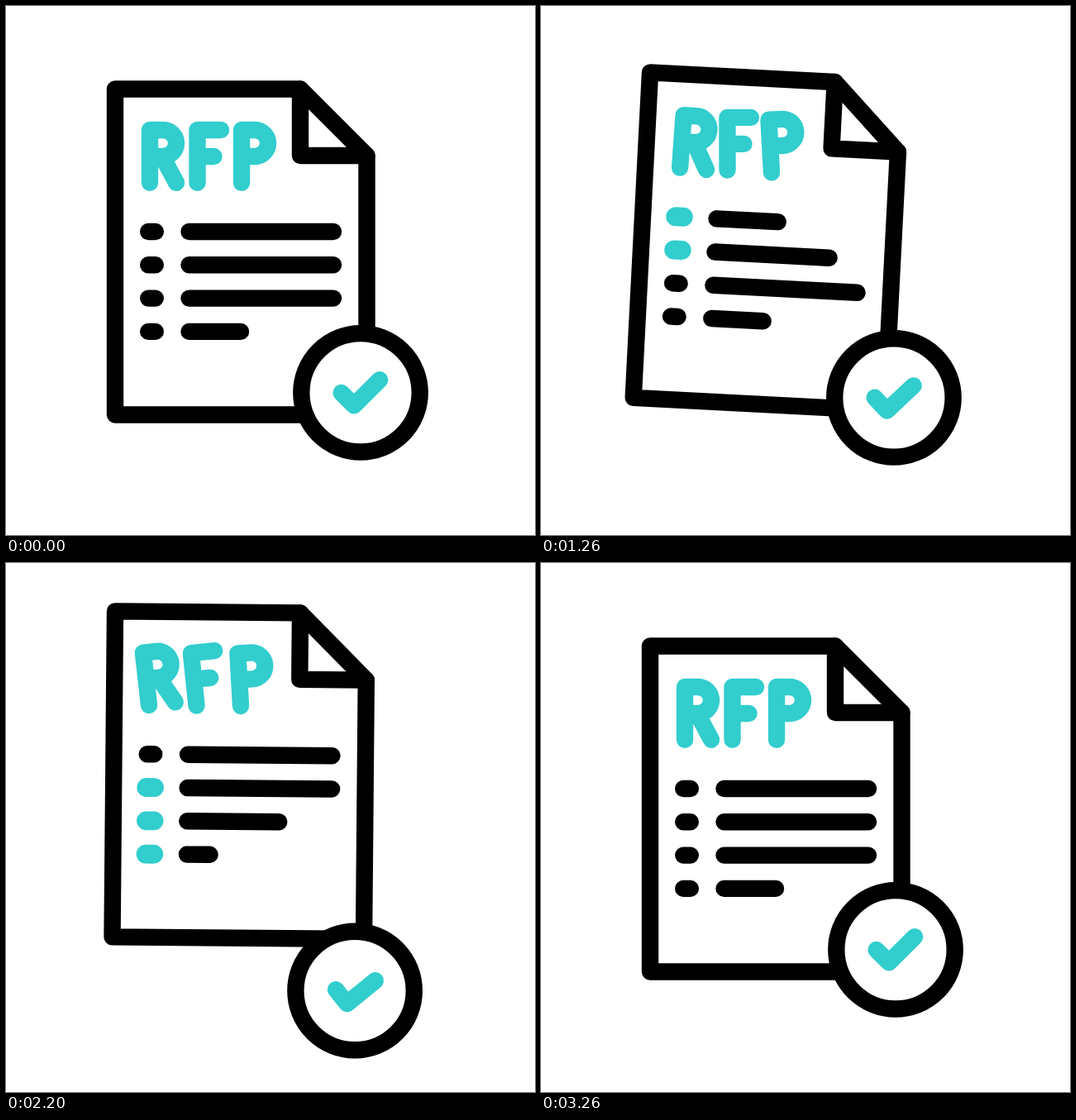
These frames come from a looping animation (640x640 px, 3.6 s). An HTML page with a canvas:

```html
<!DOCTYPE html>
<html lang="en">
<head>
<meta charset="utf-8">
<title>RFP approved</title>
<style>
  html, body { margin: 0; height: 100%; overflow: hidden; background: #fff; }
  canvas { display: block; }
</style>
</head>
<body>
<canvas id="stage" width="640" height="640" role="img" aria-label="RFP"></canvas>
<script>
const ctx = document.getElementById('stage').getContext('2d');
const TEAL = '#32cdcd', LOOP = 3600, RAD = Math.PI / 180;

const clamp = v => Math.max(0, Math.min(1, v));

// Smooth step from 0 to 1
const ease = (t, start, end) => (1 - Math.cos(Math.PI * clamp((t - start) / (end - start)))) / 2;

// Up to 1 and back to 0
const pulse = (t, start, turn, end) => ease(t, start, turn) - ease(t, turn, end);

// Swings between -1 and 1, leaving and reaching rest within the first and last step
function sway(u, steps) {
  if (u <= 0 || u >= steps) return 0;
  const wave = Math.cos(Math.PI * u);
  if (u < 1) return (wave - 1) / 2;
  return u > steps - 1 ? (wave + Math.cos(Math.PI * (steps - 1))) / 2 : wave;
}

function stroke(path, color = '#000') {
  ctx.strokeStyle = color;
  ctx.stroke(typeof path === 'string' ? new Path2D(path) : path);
}

function placed(x, y, degrees, scale, draw) {
  ctx.save();
  ctx.translate(x, y);
  ctx.rotate(degrees * RAD);
  ctx.scale(scale, scale);
  draw();
  ctx.restore();
}

// Letters with their foot at 0,0
const stem = 'M0 0V-63.7', bowl = 'H16a16 16 0 0 1 0 32H0';
const letters = [
  { x: 174, path: stem + bowl + 'M15-31.7L32 0' },
  { x: 231.5, path: stem + 'H28.5M0-31.7H20' },
  { x: 285, path: stem + bowl }
];

function drawSwoosh(t, x, y, r, from, sweep, start, tailStart, end) {
  const head = Math.sin(Math.PI / 2 * clamp((t - start) / 490));
  const tail = ease(t, tailStart, end);
  if (tail >= head) return;
  const arc = new Path2D();
  arc.arc(x, y, r, (from + sweep * tail) * RAD, (from + sweep * head) * RAD, sweep < 0);
  stroke(arc, TEAL);
}

function drawRow(t, i) {
  const y = 273 + 40.3 * i;
  const local = t - 440 * i ** 0.8;
  const glow = ease(local, 580, 600) - ease(local, 1820, 1840);
  const color = `rgb(${50 * glow},${205 * glow},${205 * glow})`;
  placed(176.5, y, 0, 1 + 0.12 * glow, () => stroke('M-4.3 0H4.3', color));
  const full = i < 3 ? 174.5 : 62.5;
  stroke(`M221.5 ${y}h${full * (1 - 0.58 * pulse(local, 540, 1230, 1720))}`);
}

function drawPage(t) {
  const lift = 5 * pulse(t, 1040, 1480, 2270)
    - 45.5 * pulse(t, 280, 1040, 1480) - 43 * pulse(t, 1480, 2270, 2760);
  const tilt = -3 * sway((t - 730) / 576, 4);
  placed(132, 100.5 + lift, tilt, 1, () => {
    ctx.translate(-132, -100.5);
    const sheet = new Path2D('M132 100.5H356L436.5 181V494.5H132Z');
    ctx.fillStyle = '#fff';
    ctx.fill(sheet);
    stroke(sheet);
    stroke('M356 100.5V181H436.5');
    letters.forEach(({ x, path }, i) =>
      placed(x, 213.7, 7 * sway((t - 300 - 120 * i) / 620, 4), 1, () => stroke(path, TEAL)));
    for (let i = 0; i < 4; i++) drawRow(t, i);
  });
}

function drawBadge(t) {
  const x = 7.8 * sway((t - 1145) / 335, 5);
  const y = 49.7 * (ease(t, 1040, 1480) - ease(t, 2420, 3060)) - 38 * pulse(t, 280, 1040, 1480);
  placed(429 + x, 467.8 + y, 0, 1, () => {
    const ring = new Path2D();
    ring.arc(0, 0, 71.7, 0, 7);
    ctx.fillStyle = '#fff';
    ctx.fill(ring);
    stroke(ring);

    // The tick rocks on its elbow while both arms grow and shrink
    const grow = 13.7 * pulse(t, 1280, 1840, 2190) - 9.7 * pulse(t, 2190, 2540, 3020);
    const short = -(21.7 + grow) * Math.SQRT1_2, long = (44 + grow) * Math.SQRT1_2;
    placed(-8 + 0.2 * x, 15.5, -0.85 * x, 1, () =>
      stroke(`M${short} ${short}L0 0L${long} ${-long}`, TEAL));
  });
}

function frame() {
  const t = performance.now() % LOOP;
  ctx.fillStyle = '#fff';
  ctx.fillRect(0, 0, 640, 640);
  ctx.lineWidth = 20.4;
  ctx.lineCap = ctx.lineJoin = 'round';
  drawSwoosh(t, 192.5, 412.5, 150.5, 180, -121, 1370, 1825, 2010);
  drawSwoosh(t, 414, 249, 150.5, -60, 95, 2820, 3060, 3250);
  drawPage(t);
  drawBadge(t);
  requestAnimationFrame(frame);
}
frame();
</script>
</body>
</html>
```
